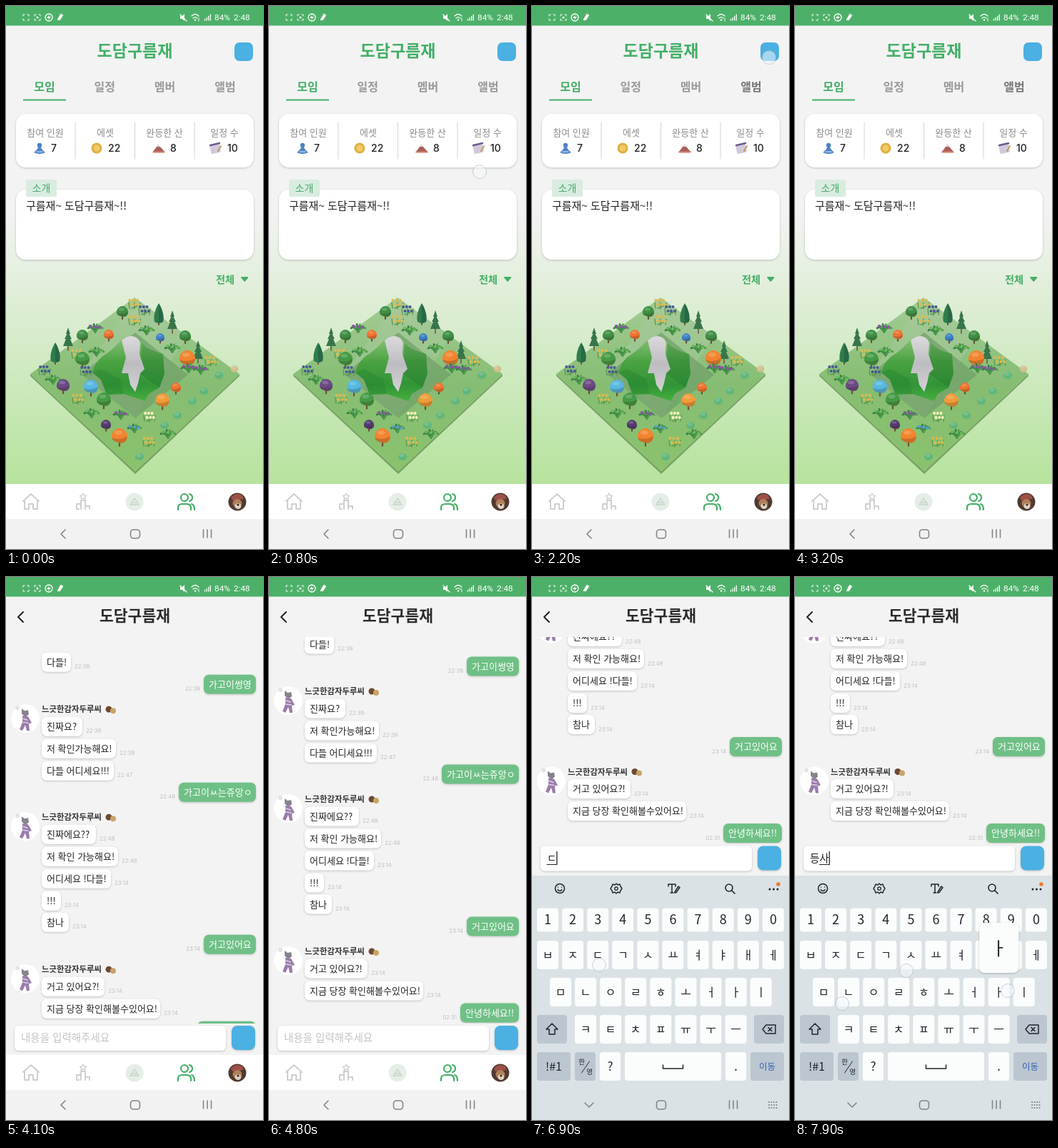
An HTML page for the animation above (8 s loop, 360 px wide and 760 px high).

```html
<!DOCTYPE html>
<html lang="ko">
<head>
<meta charset="utf-8">
<style>
html, body { margin: 0; width: 100%; height: 100%; overflow: hidden; background: #fff; }
svg { display: block; width: 360px; height: 760px; font-family: "Noto Sans CJK KR", "Noto Sans", sans-serif; }
.shade { filter: drop-shadow(0 1px 1.5px #0003); }
.latin { font-family: Inter, Roboto, sans-serif; }
</style>
</head>
<body>
<svg id="stage" viewBox="0 0 360 760"></svg>
<script>
const GREEN = '#43af66', GREY = '#f3f3f3', BLUE = '#4bb0e2';
const TEAM = '도담구름재', FRIEND = '느긋한감자두루씨';

const rect = (x, y, w, h, r, fill, more = '') =>
  `<rect x="${x}" y="${y}" width="${w}" height="${h}" rx="${r}" fill="${fill}" ${more}/>`;
const circle = (x, y, r, fill, more = '') => `<circle cx="${x}" cy="${y}" r="${r}" fill="${fill}" ${more}/>`;
const oval = (x, y, rx, ry, fill, more = '') => `<ellipse cx="${x}" cy="${y}" rx="${rx}" ry="${ry}" fill="${fill}" ${more}/>`;
const shape = (d, fill, more = '') => `<path d="${d}" fill="${fill}" ${more}/>`;
const line = (d, color, w = 1.5, more = '') =>
  `<path d="${d}" fill="none" stroke="${color}" stroke-width="${w}" stroke-linecap="round" stroke-linejoin="round" ${more}/>`;
const text = (x, y, s, size, fill, more = '') =>
  `<text x="${x}" y="${y}" font-size="${size}" fill="${fill}" ${more}>${s}</text>`;
const MID = 'text-anchor="middle"', BOLD = 'font-weight="700"', MEDIUM = 'font-weight="500"';
const group = (id, body, more = '') => `<g id="${id}" ${more}>${body}</g>`;
const at = (x, y, body) => `<g transform="translate(${x} ${y})">${body}</g>`;

function statusBar() {
  const corners = 'M-4-2v-2h2M2-4h2v2M4 2v2h-2M-2 4h-2v-2';
  const bars = [0, 1, 2, 3].map(i => line(`M${278.5 + i * 2.6} 20v${-1.5 - i * 2.1}`, '#fff', 1.3)).join('');
  const label = (x, s) => text(x, 20, s, 11.8, '#fff', 'font-family="Roboto, sans-serif"');
  return rect(0, 0, 360, 27.5, 0, '#4db069') +
    at(28, 16, line(corners, '#fff', 1)) +
    at(44, 16, line(corners, '#fff', 1) + circle(0, 0, 1.5, '#fff')) +
    at(60, 16, circle(0, 0, 5, 'none', 'stroke="#fff" stroke-width="1.3"') + shape('M1-4l-4 5h3l-1 3 4-5h-3z', '#fff')) +
    at(75, 16, line('M-2 3L2-4M0 3L4-3', '#fff', 2.2)) +
    at(248, 16, shape('M-4-2h3l3-3v10l-3-3h-3z', '#fff') + line('M-4-4L5 5', '#fff', 1.2)) +
    at(265, 16, line('M-5-2q5-5 10 0M-3 1q3-3 6 0', '#fff', 1.2) + circle(0, 3.5, 1.2, '#fff') + line('M5 1v4', '#fff', 1)) +
    bars + label(292, '84%') + label(319, '2:48');
}

const plantKinds = {
  cone: (c, s) => line('M0 10v4', '#75543a', 2) +
    shape(`M0 ${-s}C5 ${-s / 2} 8 2 6 10Q0 14-6 10C-8 2-5 ${-s / 2} 0 ${-s}`, c) +
    shape(`M0 ${-s}C5 ${-s / 2} 8 2 6 10Q3 12 0 12z`, '#123', 'opacity=".22"'),
  pine: (c, s) => line('M0 8v7', '#75543a', 1.6) +
    shape(`M0 ${-s}l3 9h-1.5l3.5 7h-2l4 10H-7l4-10h-2l3.5-7h-1.5z`, c),
  ball: (c, s) => line(`M0 ${s * .7}v${s * .55}`, '#6f4f38', 2.2) +
    shape(`M${-s} 2C${-s * 1.1} ${-s * .5} ${-s * .5} ${-s} 0 ${-s}S${s * 1.1} ${-s * .5} ${s} 2Q${s * .8} ${s} 0 ${s * .85}T${-s} 2`, c) +
    shape(`M${-s} 2Q0 ${s * .6} ${s} 0Q${s * .9} ${s} 0 ${s * .85}T${-s} 2`, '#321', 'opacity=".22"') +
    oval(-s * .15, -s * .45, s * .5, s * .28, '#fff', 'opacity=".18"'),
  blob: (c, s) => oval(0, 0, s, s * .85, c) + oval(-1, -2, s * .6, s * .4, '#fff', 'opacity=".15"'),
  fern: (c, s) => [-1, -.6, -.2, .25, .65, 1].map((k, i) =>
    line(`M0 4Q${k * s * .6} ${-s * .5} ${k * s} ${-s * (.8 - Math.abs(k) * .7)}`, i % 2 ? '#4f9c4b' : '#357f48', 2.8)).join('') +
    [-.7, 0, .6].map((k, i) => oval(k * s, -s * .4 + i, 2.4, 2, c)).join(''),
  blooms: (c, s) => line('M-7 6l-1-8M0 7v-9M7 6l1-8M-4 6l8-3', '#5a9a4c', 1.4) +
    [0, 1, 2, 3, 4, 5].map(i => circle((i - 2.5) * s / 3, i % 2 * 6 - 5, 2, c)).join('')
};
const plants = [
  ['cone', '#2e7d4c', 16, '214 432 69 487'],
  ['pine', '#37764a', 17, '233 443 87 467 269 485'],
  ['ball', '#3f8f45', 8, '163 428 107 461 251 462'],
  ['ball', '#459a45', 10, '107 494 137 551'],
  ['ball', '#ee7430', 7, '144 460 238 534'],
  ['ball', '#f2842f', 11, '159 602 254 493'],
  ['ball', '#f09c38', 10, '219 552'],
  ['ball', '#3d80ca', 6, '216 464'],
  ['ball', '#56b8e3', 10, '119 533'],
  ['ball', '#6c4a83', 9, '80 531'],
  ['ball', '#553b70', 7, '140 586'],
  ['blob', '#5fb67c', 6, '298 517 277 539 261 553 240 573 222 587 187 631'],
  ['blob', '#d0c08e', 5.5, '320 508'],
  ['fern', '#8d57a5', 10, '125 452 161 573 256 508 273 510'],
  ['fern', '#6db95b', 10, '197 455 120 571 233 480 127 485 66 524 227 600'],
  ['fern', '#5a9fd0', 9, '180 592'],
  ['blooms', '#dfba4c', 8, '180 417 180 440 101 550 287 497 200 610 100 487'],
  ['blooms', '#465a95', 7, '54 510 194 426 112 511'],
  ['blooms', '#fff3c2', 7, '201 575']
];

function terrain() {
  const spots = plants.flatMap(([kind, color, size, list]) =>
    list.match(/\d+ \d+/g).map(p => [...p.split(' ').map(Number), kind, color, size]));
  spots.sort((a, b) => a[1] - b[1]);
  const draw = ([x, y, kind, color, size]) => at(x, y, plantKinds[kind](color, size));
  return shape('M34 515L181 651 327 515V518L181 655 34 518z', '#78a565') +
    shape('M180 408L327 515 181 651 34 515z', 'url(#land)') +
    shape('M180 412L254 462 181 577 105 515z', '#a9c7a0', 'opacity=".45"') +
    shape('M181 457L255 516 181 577 105 515z', '#6f9f68', 'opacity=".7"') +
    spots.filter(s => s[1] < 500).map(draw).join('') +
    shape('M121 513Q124 500 134 491Q150 481 160 469Q166 462 176 462 185 463 190 472Q200 482 220 487L222 515 215 534 200 543 195 553 165 543 141 544 133 523z', 'url(#hill)') +
    shape('M190 472Q200 482 220 487L222 515 215 534 188 515z', '#206f2c', 'opacity=".3"') +
    shape('M121 513L133 508 160 522 165 543 141 544 133 523z', '#1f7a2b', 'opacity=".3"') +
    shape('M162 468Q168 462 176 462 185 463 188 471L187 488 194 508 188 514 185 528 181 540 174 530 171 514 162 514 168 492z', 'url(#snow)') +
    spots.filter(s => s[1] >= 500).map(draw).join('');
}

function statCard() {
  const icons = [
    circle(0, -4, 3.2, '#4f82c4') + shape('M-8 6Q-3 2-2-1H2Q3 2 8 6 0 10-8 6z', '#4f82c4') + line('M-4 5h8', '#a9cbf0', 1.5),
    circle(0, 0, 7.5, '#dfb040') + circle(0, 0, 4.5, '#efcb66'),
    shape('M-9 6Q-4 0-1-5 4 0 9 6z', '#a5605c') + shape('M-3-2L-1-5 2-2z', '#f3d9d6') + line('M-7 5.5h14', '#dd8068', 2),
    rect(-7, -6, 14, 13, 2, '#d0cbdc', 'transform="rotate(-12)"') + line('M-7-4l13-3', '#6c5a8d', 2.5) + line('M4 4l4-7', '#c9975a', 2)
  ];
  const cells = [['참여 인원', 7, 55, 47, 63], ['에셋', 22, 139, 127, 143], ['완등한 산', 8, 222, 214, 230], ['일정 수', 10, 306, 293, 310]];
  return rect(14, 151, 333, 75, 14, '#fff', 'class="shade"') +
    [97, 180.5, 264].map(x => line(`M${x} 163V214`, '#d4d4d4', 1)).join('') +
    cells.map(([label, n, cx, ix, nx], i) => text(cx, 182, label, 13, '#8b8b8b', MID + MEDIUM) +
      at(ix, 199, icons[i]) + text(nx, 203.5, n, 14, '#222', 'class="latin" ' + MEDIUM)).join('');
}

function homePage() {
  const tabs = ['모임', '일정', '멤버', '앨범'].map((s, i) =>
    text(54 + i * 84.3, 119, s, 16, i ? '#999' : GREEN, `${MID} ${BOLD} id="tab${i}"`)).join('');
  return rect(0, 27.5, 360, 641.5, 0, 'url(#sky)') +
    text(180.5, 71, TEAM, 23, GREEN, MID + BOLD) + rect(320, 51, 26, 26, 7, BLUE) +
    tabs + rect(24, 130.5, 60, 2, 0, GREEN) + statCard() +
    rect(14, 257, 333, 98, 14, '#fff', 'class="shade"') +
    rect(28, 243, 43, 24, 2, '#d9ece0') + text(49.5, 260, '소개', 14, '#4aa96a', MID + MEDIUM) +
    text(28, 285, `구름재~ ${TEAM}~!!`, 15, '#222') +
    text(294, 388, '전체', 14.2, GREEN, BOLD) + shape('M330 379h8.5q1.5 0 .7 1.5l-4 4.7q-.9 1-1.8 0l-4-4.7q-.9-1.5.6-1.5z', GREEN) +
    terrain();
}

// Each message: vertical centre, bubble width, time, words; own ones sit on the right.
const friendSays = [
  [94, 41, '22:39', '다들!'], [184, 57, '22:39', '진짜요?'], [215, 104, '22:39', '저 확인가능해요!'],
  [246, 101, '22:47', '다들 어디세요!!!'], [335, 76, '22:48', '진짜에요??'], [366, 107, '22:48', '저 확인 가능해요!'],
  [397, 97, '23:14', '어디세요 !다들!'], [428, 27, '23:14', '!!!'], [458, 38, '23:14', '참나'],
  [548, 88, '23:14', '거고 있어요?!'], [579, 166, '23:14', '지금 당장 확인해볼수있어요!']
];
const ownSays = [
  [125, 73, '22:39', '가고이썽영'], [276, 108, '22:48', '가고이ㅆ는쥬앙ㅇ'],
  [489, 73, '23:14', '거고있어요'], [610, 82, '02:31', '안녕하세요!!']
];

function messages() {
  const bubble = (x, y, w, fill, s, ink) => rect(x, y - 13.5, w, 27, 7, fill, 'class="shade"') + text(x + 7, y + 4.5, s, 13, ink);
  const stamp = (x, y, s, more = '') => text(x, y + 9, s, 7.8, '#b0b0b0', `class="latin" font-weight="300" ${more}`);
  const avatar = y => circle(27, y, 20, '#fff') + circle(16, y - 15, 3, '#e2e2e2') +
    at(27, y, shape('M-5-14l4 3 5-1 1 6-5 4-5-5z', '#85838c') +
      shape('M-4-4L4-3 9 6 5 7 6 17H2L0 9-4 17-8 15-4 5z', '#9a7cab') + line('M-3 0l6 2M-3 5l7 1', '#ddd0e2', 1.5)) +
    text(50, y - 9, FRIEND, 11.4, '#333', BOLD) + circle(144, y - 13, 4.5, '#6f4a30') + circle(150, y - 11, 4, '#c9a468');
  return [173, 324, 537].map(avatar).join('') +
    friendSays.map(([y, w, t, s]) => bubble(50, y, w, '#fff', s, '#222') + stamp(55 + w, y, t)).join('') +
    ownSays.map(([y, w, t, s]) => bubble(350 - w, y, w, '#6fc086', s, '#fff') + stamp(345 - w, y, t, 'text-anchor="end"')).join('');
}

function chatPage() {
  return rect(0, 27.5, 360, 641.5, 0, GREY, 'id="chatBack"') +
    group('window', group('list', messages()), 'clip-path="url(#listClip)"') +
    text(180.5, 62, TEAM, 21.5, '#2b2b2b', MID + BOLD) + line('M24 49l-7 7 7 7', '#222', 2) +
    group('composer', rect(0, 625, 360, 44, 0, GREY) + rect(12, 628, 296, 35, 6, '#fff', 'class="shade"') +
      text(21, 650, '내용을 입력해주세요', 14.5, '#c4c4c4', 'id="hint" ' + MEDIUM) +
      text(21, 650, '', 14.5, '#222', 'id="typed" ' + MEDIUM) +
      line('', '#222', 1, 'id="underline"') + line('', '#222', 1.3, 'id="caret"') +
      rect(316, 628, 33, 34, 8, BLUE, 'class="shade"'));
}

function tabBar() {
  const pale = '#cfcfcf';
  return rect(0, 669, 360, 49, 0, '#fff') +
    at(35, 694, line('M-11-1L0-11 11-1M-9-2V10H-3V3H3V10H9V-2', pale, 2)) +
    at(108, 694, line('M-9 10V3h6v-5h6v8h6v4M-9 10h3M-3 10V3M3 10v-4', pale, 2) + line('M0-12l1.5 3 3 .4-2.2 2 .6 3-2.9-1.5-2.9 1.5.6-3-2.2-2 3-.4z', pale, 1.3)) +
    at(180, 694, circle(0, 0, 12.5, '#e5eee6') + line('M-6 4L0-5 6 4zM-3 1h6', '#c5d4c7', 1.3)) +
    at(252, 694, circle(-2, -6, 5, 'none', `stroke="${GREEN}" stroke-width="2.2"`) +
      line('M-11 11V8Q-11 3-5 3H1Q7 3 7 8V11M5-11Q9-10 9-6T5-1M8 3Q12 4 12 11', GREEN, 2.2)) +
    at(324, 694, circle(0, 0, 12.5, '#4f3a30') + shape('M-9-6Q-2-14 7-9L9-4-7-2z', '#9c5048') +
      oval(0, 2, 6.5, 6, '#b18058') + oval(1, 6, 4.5, 4, '#ddd0c0') + circle(1, 4, 1.6, '#30211c'));
}

// Keyboard rows: first key centre, row centre, letters.
const rows = [[22, 480, '1234567890'], [22, 529, 'ㅂㅈㄷㄱㅅㅛㅕㅑㅐㅔ'], [40, 581, 'ㅁㄴㅇㄹㅎㅗㅓㅏㅣ'], [75, 633, 'ㅋㅌㅊㅍㅠㅜㅡ']];
const STEP = 35.1, keySpot = {};

function keyboard() {
  const soft = '#bcc6d0', ink = '#20252a';
  const key = (x, y, w, fill, body, h = 40) => rect(x, y - h / 2, w, h, 4, fill) + at(x + w / 2, y, body);
  const label = (s, size, fill = ink, more = '') => text(0, size * .36, s, size, fill, `${MID} ${more}`);
  const letters = rows.map(([x0, y, row], r) => [...row].map((c, i) => {
    const x = x0 + i * STEP;
    keySpot[c] = [x, y];
    return key(x - 15, y, 30, '#fbfcfc', label(c, r ? 16 : 18, ink, r ? MEDIUM : ''), r ? 40 : 33);
  }).join('')).join('');
  return rect(0, 418, 360, 342, 0, '#dbe2e6') +
    at(39, 436, circle(0, 0, 6.5, 'none', `stroke="${ink}" stroke-width="1.5"`) + line('M-3 1.5q3 4 6 0M-2.5-2v.1M2.5-2v.1', ink, 1.4)) +
    at(118, 436, line('M0-7l2 2 3-1 1 3 2 3-2 3-1 3-3-1-2 2-2-2-3 1-1-3-2-3 2-3 1-3 3 1z', ink, 1.4) + circle(0, 0, 2.2, 'none', `stroke="${ink}" stroke-width="1.3"`)) +
    at(198, 436, line('M-7-3v-3H3v3M-2-6V6M-4 6h4M2 5l5-8 2 1.5-5 7-2 .5', ink, 1.5)) +
    at(277, 436, circle(-1, -1, 5, 'none', `stroke="${ink}" stroke-width="1.6"`) + line('M3 3l4 4', ink, 1.7)) +
    [333, 338.5, 344].map(x => circle(x, 437, 1.5, ink)).join('') + circle(345, 430, 2.8, '#ee7a2c') +
    letters +
    key(7, 633, 42, soft, line('M0-8L8 0H4V7H-4V0H-8z', ink, 1.5)) +
    key(311, 633, 42, soft, line('M-9 0l5-6H9V6H-4zM-1-2.5l5 5M4-2.5l-5 5', ink, 1.5)) +
    key(7, 685, 47, soft, label('!#1', 16, ink, MEDIUM)) +
    key(60, 685, 29, soft, text(-5, -3, '한', 9.5, ink, MID) + text(6, 11, '영', 9.5, ink, MID) + line('M-5 9L6-7', ink, 1)) +
    key(95, 685, 29, '#fbfcfc', label('?', 17, ink, MEDIUM)) +
    key(130, 685, 135, '#fbfcfc', line('M-14-2v5H14v-5', ink, 1.5)) +
    key(271, 685, 29, '#fbfcfc', label('.', 18, ink, MEDIUM)) +
    key(306, 685, 47, soft, label('이동', 12.5, '#2f62b5', MEDIUM));
}

function navBar() {
  const c = '#828588';
  return rect(0, 718, 360, 42, 0, '#f2f2f2', 'id="navBack"') +
    line('M83 733l-6 6 6 6', c, 1.6, 'id="back"') + line('M74 736l6 6 6-6', c, 1.6, 'id="hide"') +
    rect(174.5, 733, 13, 12, 4, 'none', `stroke="${c}" stroke-width="1.6"`) +
    line('M276.5 733v11M282 733v11M287.5 733v11', c, 1.6) +
    line('M332 735h14M332 739h14M332 743h14', c, 2, 'id="keysIcon" stroke-dasharray=".1 3.4"');
}

const fade = (id, ...stops) => `<linearGradient id="${id}" x1="0" y1="0" x2="0" y2="1">` +
  stops.map(([o, c]) => `<stop offset="${o}" stop-color="${c}"/>`).join('') + '</linearGradient>';

stage.innerHTML = '<defs>' +
  fade('sky', [0, GREY], [.4, GREY], [1, '#b6e39d']) + fade('land', [0, '#a4cc96'], [.5, '#86bd73'], [1, '#8bc26d']) +
  fade('hill', [0, '#8bc47c'], [.4, '#4aa240'], [.75, '#319437'], [1, '#46b03e']) +
  fade('snow', [0, '#dcdadd'], [.5, '#bdbcc0'], [1, '#d3d2d6']) +
  `<clipPath id="listClip">${rect(0, 84, 360, 541, 0, '#000')}</clipPath></defs>` +
  group('home', homePage()) + group('chat', chatPage()) + group('tabs', tabBar()) +
  group('keys', keyboard()) + navBar() +
  group('popup', rect(-27.5, -97, 55, 70, 7, '#fbfcfc', 'class="shade"') + text(0, -52, '', 25, '#20252a', `${MID} id="popupLetter"`)) +
  group('touches', '') + statusBar();

const $ = id => document.getElementById(id);
const show = (id, on) => $(id).setAttribute('visibility', on ? 'inherit' : 'hidden');
const move = (id, x, y) => $(id).setAttribute('transform', `translate(${x} ${y})`);
const progress = (t, from, to) => Math.min(1, Math.max(0, (t - from) / (to - from)));

const CHAT = 3900, FOCUS = 5900, ADVANCE = 14.5 * .92;
// Key presses: time, letter, text after the press, touch point.
const presses = [
  [6700, 'ㄷ', 'ㄷ', 94, 543], [6950, 'ㅡ', '드', 288, 646], [7200, 'ㅇ', '등', 115, 592],
  [7600, 'ㅅ', '등ㅅ', 156, 551], [7780, 'ㅏ', '등사', 298, 579], [7880, '', '등사', 66, 597]
];

const touchRing = (x, y) =>
  circle(x, y, 9.5, '#f4f8fb', 'fill-opacity=".55" stroke="#9fb0bc" stroke-opacity=".55"');

function render(t) {
  const inChat = t >= CHAT, typing = t >= FOCUS;
  show('home', !inChat);
  show('chat', inChat);
  show('tabs', !typing);
  show('keys', typing);
  show('navBack', !typing);
  show('back', !typing);
  show('hide', typing);
  show('keysIcon', typing);
  $('tab3').setAttribute('fill', t > 1800 ? '#777' : '#999');

  const lift = typing ? -251.5 : 0;
  $('chatBack').setAttribute('height', typing ? 390.5 : 641.5);
  move('list', 0, lift + 60 * (1 - progress(t, CHAT, 4700)) ** 3);
  move('composer', 0, lift);
  const rise = progress(t, FOCUS, FOCUS + 400);
  move('keys', 0, 342 * (1 - rise) ** 2.11);
  $('keys').setAttribute('opacity', Math.min(1, .3 + rise * .8));

  const done = presses.filter(p => t >= p[0]);
  const words = done.length ? done[done.length - 1][2] : '';
  const end = 21 + words.length * ADVANCE;
  show('hint', !words);
  $('typed').textContent = words;
  $('underline').setAttribute('d', words ? `M${end - ADVANCE} 654H${end}` : '');
  const caretOn = typing && (words || (t - FOCUS) % 1000 < 500);
  $('caret').setAttribute('d', caretOn ? `M${end + .5} 636V654` : '');

  const pressed = done.filter(p => p[1] && t < p[0] + 180).pop();
  show('popup', pressed);
  if (pressed) {
    move('popup', ...keySpot[pressed[1]]);
    $('popupLetter').textContent = pressed[1];
  }

  let rings = done.filter(p => t < p[0] + 320).map(p => touchRing(p[3], p[4])).join('');
  if (t > 500 && t < 2600) {
    const u = progress(t, 1000, 2000);
    const s = u * u * (3 - 2 * u);
    rings += touchRing(295 + 37 * s, 232 - 160 * s);
  }
  if (t > 5650 && t < 5850) rings += touchRing(140, 646);
  $('touches').innerHTML = rings;
}

function tick(now) {
  render(now % 8000);
  requestAnimationFrame(tick);
}
tick(performance.now());
</script>
</body>
</html>
```
